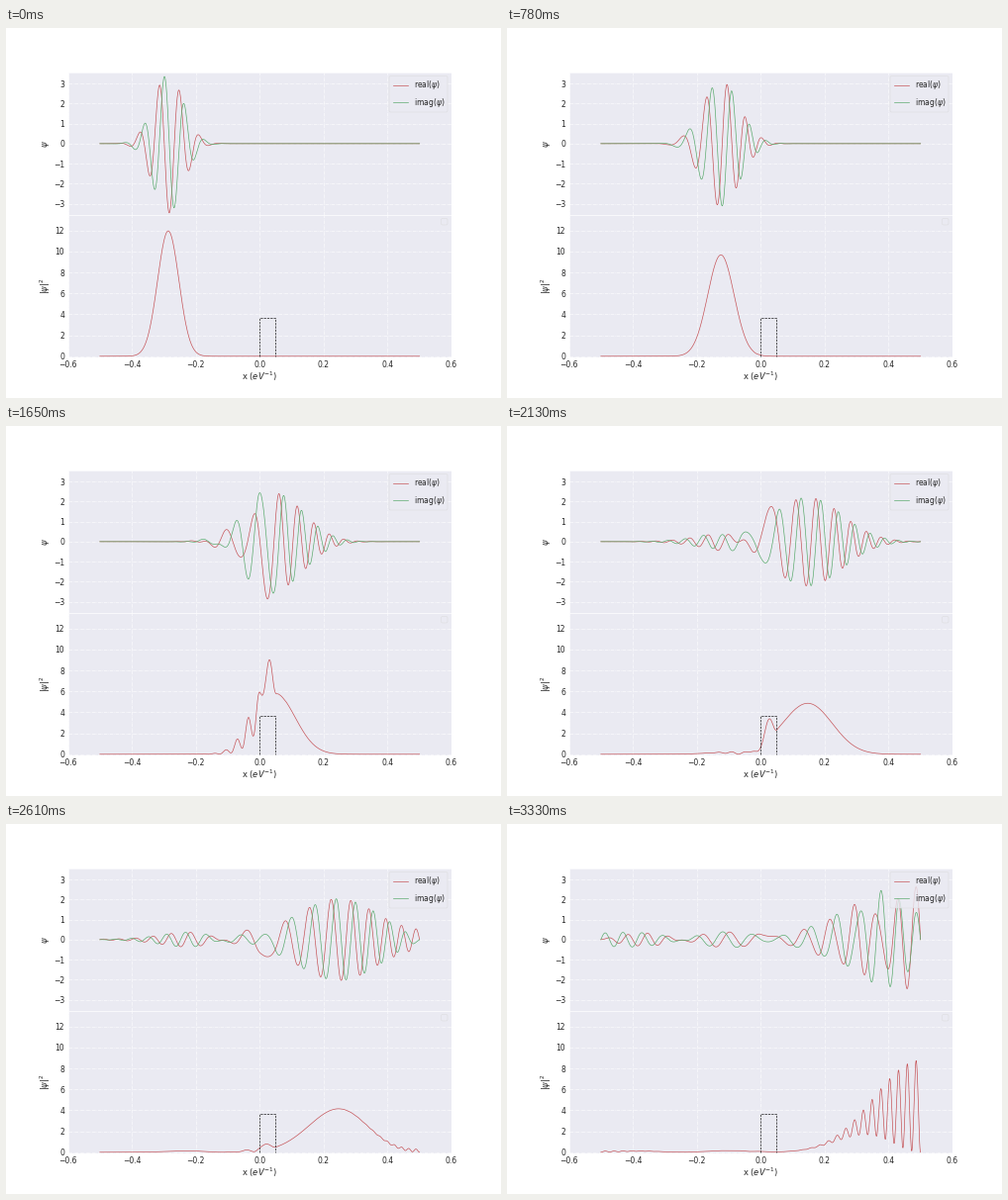
Recreate the animation shown at these times as a matplotlib script. Size 500x374 px, loop 3360 ms.

```python
import numpy as np
import matplotlib.pyplot as plt
from matplotlib.animation import FuncAnimation
from matplotlib.lines import Line2D
from matplotlib.patches import FancyBboxPatch
from matplotlib.transforms import Affine2D

W, H, DPI = 500, 374, 50
FRAMES, INTERVAL = 112, 30

RED, GREEN, BG, INK = "#C44E52", "#55A868", "#EAEAF2", "0.15"
LINE = 0.95

# Wave packet, barrier and time step (hbar / mass per frame)
X0, K0, SIGMA = -0.286, 100.0, 1 / 30
BARRIER_WIDTH, BARRIER_K2, BARRIER_TOP = 0.05, 3700.0, 3.65
STEP = 6.215e-5
MODES = 120

plt.rcParams.update({
    "font.family": "DejaVu Sans",
    "text.color": INK,
    "xtick.color": INK,
    "ytick.color": INK,
    "axes.axisbelow": True,
})


def modes(x):
    """Sine modes of the box from -0.5 to 0.5, one per column."""
    n = np.arange(1, MODES + 1)
    return np.sqrt(2) * np.sin(np.pi * np.outer(x + 0.5, n))


def solve():
    """Energies and energy eigenstates in the sine basis."""
    cells = 400
    inside = modes((np.arange(cells) + 0.5) * BARRIER_WIDTH / cells)
    overlap = inside.T @ inside * BARRIER_WIDTH / cells
    kinetic = np.diag((np.pi * np.arange(1, MODES + 1)) ** 2)
    return np.linalg.eigh((kinetic + BARRIER_K2 * overlap) / 2)


x = np.linspace(-0.5, 0.5, 1001)
energy, vectors = solve()
states = modes(x) @ vectors
packet = (2 * np.pi * SIGMA**2) ** -0.25 * np.exp(
    -((x - X0) ** 2) / (4 * SIGMA**2) + 1j * K0 * x)
weights = states.T @ packet * (x[1] - x[0])


def psi(frame):
    return states @ (weights * np.exp(-1j * energy * STEP * frame))


fig, (top, bottom) = plt.subplots(
    2, 1, sharex=True, figsize=(W / DPI, H / DPI), dpi=DPI,
    gridspec_kw=dict(left=0.125, right=0.9, bottom=0.11, top=0.88, hspace=0))
fig.patch.set_facecolor("white")
pixels = Affine2D().scale(1 / W, -1 / H).translate(0, 1) + fig.transFigure

for ax in (top, bottom):
    ax.set_facecolor(BG)
    ax.grid(color="white", lw=0.8, ls="-.")
    ax.tick_params(length=0, pad=5, labelsize=11)
    for spine in ax.spines.values():
        spine.set(color="white", lw=1)
top.tick_params(labelbottom=False)
top.set(xlim=(-0.6, 0.6), ylim=(-3.55, 3.55), yticks=range(-3, 4))
bottom.set(ylim=(-0.1, 13.5), yticks=range(0, 13, 2),
           xticks=np.linspace(-0.6, 0.6, 7))

real, = top.plot([], [], color=RED, lw=LINE)
imag, = top.plot([], [], color=GREEN, lw=LINE)
density, = bottom.plot([], [], color=RED, lw=LINE)
bottom.plot([0, 0, BARRIER_WIDTH, BARRIER_WIDTH],
            [0, BARRIER_TOP, BARRIER_TOP, 0], "k--", lw=0.9)


def label(px, py, text, size=12, **kw):
    kw = {"ha": "center", "va": "center", **kw}
    fig.text(px, py, text, transform=pixels, fontsize=size, **kw)


def legend_box(px, py, w, h):
    fig.add_artist(FancyBboxPatch(
        (px, py), w, h, boxstyle="round,pad=0,rounding_size=1.5",
        transform=pixels, fc=BG, ec="0.84", lw=0.7, alpha=0.8))


label(40, 117, r"$\psi$", rotation=90)
label(39.5, 260.5, r"$|\psi|^2$", rotation=90)
label(256, 352.5, r"x ($eV^{-1}$)")

legend_box(387, 48.5, 59, 36.5)
legend_box(439.5, 192.5, 6.5, 6.5)
for row, color, text in ((58, RED, r"real($\psi$)"), (75, GREEN, r"imag($\psi$)")):
    fig.add_artist(Line2D([390.5, 406], [row, row], color=color, lw=LINE,
                          transform=pixels))
    label(412.3, row, text, 11, ha="left")


def draw(frame):
    wave = psi(frame)
    real.set_data(x, wave.real)
    imag.set_data(x, wave.imag)
    density.set_data(x, np.abs(wave) ** 2)
    return real, imag, density


anim = FuncAnimation(fig, draw, frames=FRAMES, interval=INTERVAL,
                     repeat=True, repeat_delay=0)
plt.show()
```
